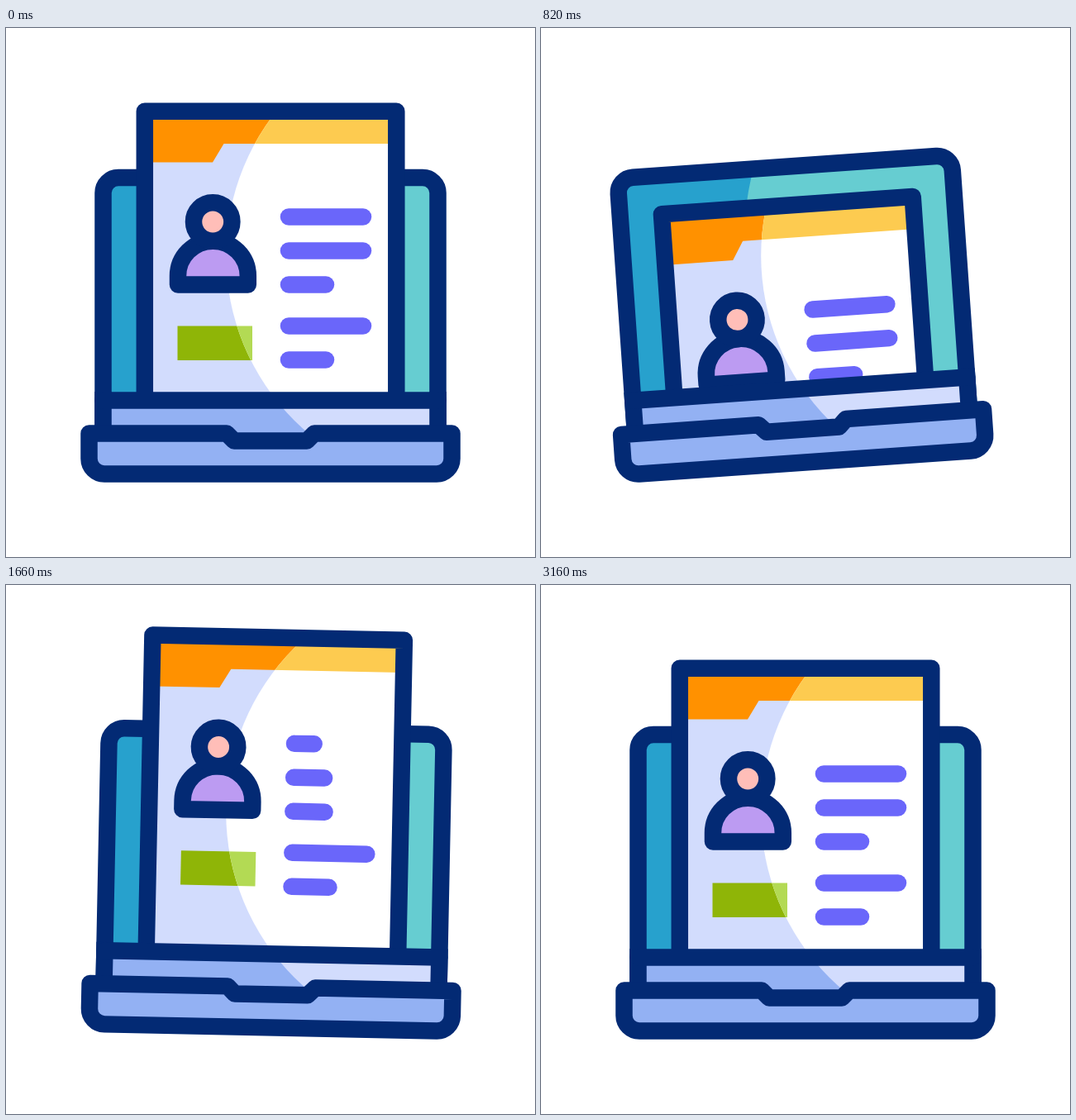
Recreate the animation shown at these times as an HTML page with a canvas. Size 640 px wide and 640 px high, loop 3600 ms.

```html
<!DOCTYPE html>
<html lang="en">
<head>
<meta charset="utf-8">
<title>Laptop profile</title>
<style>
html, body { margin: 0; width: 100%; height: 100%; overflow: hidden; background: #fff; }
canvas { display: block; width: 640px; height: 640px; }
</style>
</head>
<body>
<canvas id="stage" width="640" height="640"></canvas>
<script>
const ctx = document.getElementById('stage').getContext('2d');
const LOOP = 3600;
const NAVY = '#032a74', STROKE = 20.5;
const DARK = { lid: '#27a1cd', paper: '#d2dcfd', tab: '#ff9100', button: '#8fb507', bar: '#93b1f3' };
const LIGHT = { lid: '#66cdd1', paper: '#ffffff', tab: '#fdcb50', button: '#b3da54', bar: '#d2dcfd' };

// [time, value] steps, eased between neighbours
const TILT = [[0, 0], [345, -5], [667, -5], [1333, 2.4], [2120, -0.9], [2460, 0]];
const SLIDE = [[0, 0], [140, 0], [345, 134], [700, 134], [1690, -33.5], [2255, 0]];
const TRIM = [[1000, 1], [1600, 0.24], [2180, 1]];
const STAGGER = 245;
const LINES = [[228.5, 90], [269.5, 90], [310.5, 45], [360.5, 90], [401.5, 45]];

const lidPath = new Path2D('M117.5 495V199.5A18.5 18.5 0 0 1 136 181H504A18.5 18.5 0 0 1 522.5 199.5V495');
const bandPath = new Path2D('M117.5 450.5H522.5');
const sheetPath = new Path2D('M167.8 540V100.7H472.3V540');
const tabPath = new Path2D('M170 105H470V140H263.5L250 162.5H170Z');
const bodyPath = new Path2D('M208 310.5V300A42.4 42.4 0 0 1 292.8 300V310.5Z');
const headPath = new Path2D('M227 234.5a23.2 23.2 0 1 0 46.4 0a23.2 23.2 0 1 0 -46.4 0Z');
const basePath = new Path2D('M100.5 490.5H267L276 499.5H364L373 490.5H539.5V521A18.5 18.5 0 0 1 521 539.5' +
  'H119A18.5 18.5 0 0 1 100.5 521Z');
const glow = new Path2D();
glow.arc(548, 275.5, 281.8, 0, Math.PI * 2);
const aboveBand = new Path2D('M0 -200H640V450H0Z');

function ease(steps, t) {
  if (t <= steps[0][0]) return steps[0][1];
  for (let i = 1; i < steps.length; i++) {
    const [t0, a] = steps[i - 1], [t1, b] = steps[i];
    if (t < t1) {
      const u = (t - t0) / (t1 - t0);
      return a + (b - a) * u * u * (3 - 2 * u);
    }
  }
  return steps[steps.length - 1][1];
}

function fill(path, color) {
  ctx.fillStyle = color;
  ctx.fill(path);
}

function stroke(path, color = NAVY) {
  ctx.strokeStyle = color;
  ctx.stroke(path);
}

function box(color, x, y, w, h) {
  ctx.fillStyle = color;
  ctx.fillRect(x, y, w, h);
}

function scoped(draw) {
  ctx.save();
  draw();
  ctx.restore();
}

// the laptop rocks on its lower left or lower right corner
function tilt(deg) {
  const x = deg < 0 ? 119 : 521;
  ctx.translate(x, 540);
  ctx.rotate(deg * Math.PI / 180);
  ctx.translate(-x, -540);
}

function drawSheet(colors, slide) {
  scoped(() => {
    ctx.clip(aboveBand);
    ctx.translate(0, slide);
    box(colors.paper, 168, 101, 304, 430);
    fill(tabPath, colors.tab);
    box(colors.button, 207.5, 360.5, 90.5, 41.5);
  });
  box(colors.bar, 120, 455, 400, 45);
}

function drawDetails(t, slide) {
  ctx.clip(aboveBand);
  ctx.translate(0, slide);
  stroke(sheetPath);
  fill(bodyPath, '#bc9bf2');
  stroke(bodyPath);
  fill(headPath, '#ffbeb8');
  stroke(headPath);
  LINES.forEach(([y, length], i) => {
    const line = new Path2D();
    line.moveTo(342, y);
    line.lineTo(342 + length * ease(TRIM, t - i * STAGGER), y);
    stroke(line, '#6a66fa');
  });
}

function render(t) {
  const deg = ease(TILT, t), slide = ease(SLIDE, t);
  ctx.setTransform(1, 0, 0, 1, 0, 0);
  box('#ffffff', 0, 0, 640, 640);
  ctx.lineWidth = STROKE;
  ctx.lineCap = ctx.lineJoin = 'round';

  // the lid's shading tilts with it
  scoped(() => {
    tilt(deg);
    fill(lidPath, DARK.lid);
    scoped(() => {
      ctx.clip(glow);
      fill(lidPath, LIGHT.lid);
    });
    stroke(lidPath);
    drawSheet(DARK, slide);
  });

  // the sheet's shading stays fixed on the stage
  scoped(() => {
    ctx.clip(glow);
    tilt(deg);
    drawSheet(LIGHT, slide);
  });

  scoped(() => {
    tilt(deg);
    scoped(() => drawDetails(t, slide));
    scoped(() => {
      ctx.clip(new Path2D('M0 440H640V640H0Z'));
      stroke(lidPath);
    });
    stroke(bandPath);
    fill(basePath, DARK.bar);
    stroke(basePath);
  });
}

function tick() {
  render(performance.now() % LOOP);
  requestAnimationFrame(tick);
}
render(0);
requestAnimationFrame(tick);
</script>
</body>
</html>
```
